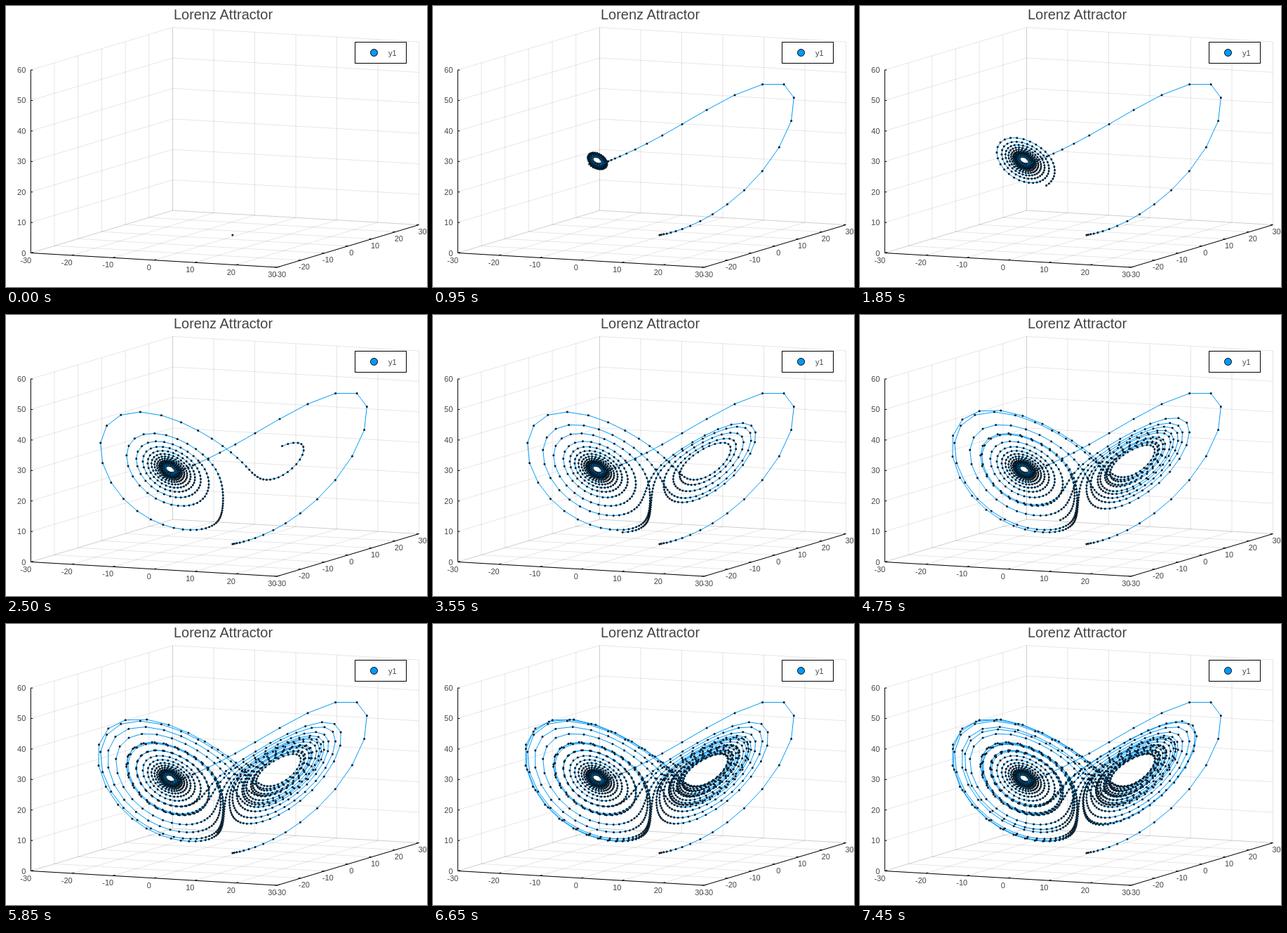
An HTML page for the animation above (7500 ms loop, 600 by 400 pixels).

```html
<!DOCTYPE html>
<html lang="en">
<head>
<meta charset="utf-8">
<title>Lorenz Attractor</title>
<style>
  html, body { margin: 0; width: 100%; height: 100%; overflow: hidden; background: #fff; }
  svg { display: block; }
  text { font-family: "Liberation Sans", Arial, sans-serif; font-size: 11px; fill: #444; text-anchor: middle; }
  path { fill: none; }
  .grid { stroke: #000; stroke-opacity: .1; }
  .axis { stroke: #000; }
  .dots { stroke-linecap: round; }
</style>
</head>
<body>
<svg id="stage" width="600" height="400" viewBox="0 0 600 400">
  <g id="frame"></g>
  <path id="line" stroke="#009afa"/>
  <path id="rims" class="dots" stroke="#000" stroke-width="3"/>
  <path id="cores" class="dots" stroke="#009afa" stroke-width="1"/>
  <text x="309.5" y="19" style="font-size:20px">Lorenz Attractor</text>
  <rect x="497.5" y="51.5" width="73" height="30" fill="#fff" stroke="#000"/>
  <circle cx="524.5" cy="66.5" r="5" fill="#009afa" stroke="#000"/>
  <text x="545" y="71" style="text-anchor:start">y1</text>
</svg>
<script>
const FRAME_MS = 50, FRAMES = 150, STEPS_PER_FRAME = 10;
const byId = id => document.getElementById(id);
const frame = byId('frame');

function add(name, attrs, text = '') {
  const el = document.createElementNS('http://www.w3.org/2000/svg', name);
  for (const key in attrs) el.setAttribute(key, attrs[key]);
  el.textContent = text;
  frame.appendChild(el);
}

// Maps x, y in -30..30 and z in 0..60 to the stage.
function project(x, y, z) {
  const u = (x + 30) / 60, v = (y + 30) / 60, w = z / 60;
  return [35.3 + 351 * u + 202.2 * v, 351.5 + 20.5 * u - 60.5 * v - 260.5 * w];
}
const at = (...p) => project(...p).map(n => n.toFixed(2)).join(' ');
const segment = (a, b, cls) => add('path', { class: cls, d: `M${at(...a)}L${at(...b)}` });

function label(p, dx, dy, value, anchor = 'middle') {
  const [x, y] = project(...p);
  add('text', { x: x + dx, y: y + dy, style: `text-anchor:${anchor}` }, value);
}

function drawAxes() {
  for (let c = -30; c <= 30; c += 10) {
    const z = c + 30;
    segment([c, -30, 0], [c, 30, 0], 'grid');
    segment([c, 30, 0], [c, 30, 60], 'grid');
    segment([-30, c, 0], [30, c, 0], 'grid');
    segment([-30, c, 0], [-30, c, 60], 'grid');
    segment([-30, -30, z], [-30, 30, z], 'grid');
    segment([-30, 30, z], [30, 30, z], 'grid');
  }
  segment([-30, -30, 0], [30, -30, 0], 'axis');
  segment([30, -30, 0], [30, 30, 0], 'axis');
  segment([-30, -30, 0], [-30, -30, 60], 'axis');
  for (let c = -30; c <= 30; c += 10) {
    const z = c + 30;
    segment([c, -30, 0], [c, -29, 0], 'axis');
    segment([30, c, 0], [29.4, c, 0], 'axis');
    segment([-30, -30, z], [-29.5, -30, z], 'axis');
    label([c, -30, 0], -7, 14, c);
    label([30, c, 0], 5, 13.5, c);
    label([-30, -30, z], -7, 4, z, 'end');
  }
}

// Each coordinate is updated before the next one uses it.
function lorenz(count) {
  const dt = 0.02, sigma = 10, rho = 28, beta = 8 / 3, points = [];
  let x = 1, y = 1, z = 1;
  for (let i = 0; i < count; i++) {
    x += dt * (sigma * (y - x));
    y += dt * (x * (rho - z) - y);
    z += dt * (x * y - beta * z);
    points.push(at(x, y, z));
  }
  return points;
}

drawAxes();
const points = lorenz(FRAMES * STEPS_PER_FRAME);
let shown = -1;

function render(ms) {
  const step = Math.floor(ms / FRAME_MS) % FRAMES;
  if (step !== shown) {
    shown = step;
    const trail = points.slice(0, step * STEPS_PER_FRAME + 1);
    const dots = trail.map(p => `M${p}h.01`).join('');
    byId('line').setAttribute('d', 'M' + trail.join('L'));
    byId('rims').setAttribute('d', dots);
    byId('cores').setAttribute('d', dots);
  }
}

const start = performance.now();
function tick() {
  render(performance.now() - start);
  requestAnimationFrame(tick);
}
tick();
</script>
</body>
</html>
```
